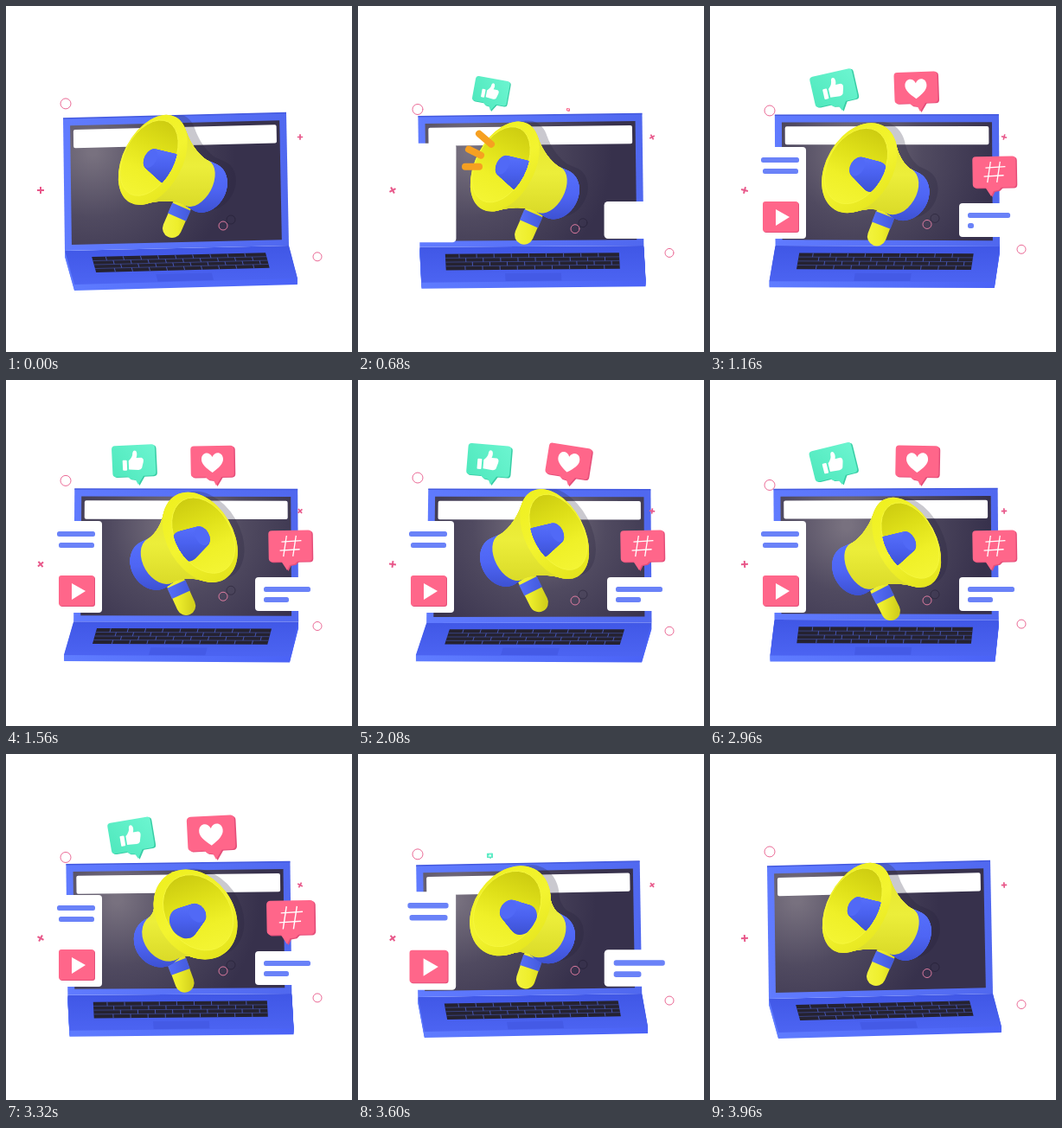
Animation, 400 px wide and 400 px high, one loop 4000 ms. Source, as an HTML page with a canvas:

```html
<!DOCTYPE html>
<html lang="en">
<head>
<meta charset="utf-8">
<title>Megaphone and laptop</title>
<style>
html, body { margin: 0; width: 100%; height: 100%; overflow: hidden; background: #fff; }
canvas { display: block; width: 400px; height: 400px; }
</style>
</head>
<body>
<canvas id="stage" width="400" height="400"></canvas>
<script>
const ctx = document.getElementById('stage').getContext('2d');
const LOOP = 4000, TAU = Math.PI * 2;
const BAR = '#6a82f8', PINK = '#ff668a', PINK_DARK = '#e54f7a', LINE = '#e8588a';

const clamp = x => Math.max(0, Math.min(1, x));
const mix = (a, b, k) => a + (b - a) * k;
const progress = (t, start, length) => clamp((t - start) / length);
const easeInOut = p => p < 0.5 ? 4 * p ** 3 : 1 - 4 * (1 - p) ** 3;
const easeOut = p => 1 - (1 - p) ** 3;
const backIn = p => 2.7 * p ** 3 - 1.7 * p * p;
const backOut = p => 1 - backIn(1 - p);
const wave = (t, mean, a, b) => mean + a * Math.cos(TAU * t / 2000) + b * Math.sin(TAU * t / 2000);

// Scale of something that pops in with overshoot and later pops out.
const pop = (t, start, length, leave) =>
  backOut(progress(t, start, length)) * (1 - backIn(progress(t, leave, 300)));

function polygon(points, fill) {
  ctx.beginPath();
  points.forEach(p => ctx.lineTo(p[0], p[1]));
  ctx.closePath();
  ctx.fillStyle = fill;
  ctx.fill();
}

function rounded(x, y, w, h, r, fill) {
  ctx.beginPath();
  ctx.roundRect(x, y, w, h, r);
  ctx.fillStyle = fill;
  ctx.fill();
}

function line(x1, y1, x2, y2, width, color, cap = 'butt') {
  ctx.beginPath();
  ctx.moveTo(x1, y1);
  ctx.lineTo(x2, y2);
  ctx.lineWidth = width;
  ctx.lineCap = cap;
  ctx.strokeStyle = color;
  ctx.stroke();
}

function placed(x, y, scale, angle, draw) {
  if (scale <= 0.01) return;
  ctx.save();
  ctx.translate(x, y);
  ctx.rotate(angle * Math.PI / 180);
  ctx.scale(scale, scale);
  draw();
  ctx.restore();
}

function gradient(x1, y1, x2, y2, ...colors) {
  const g = ctx.createLinearGradient(x1, y1, x2, y2);
  colors.forEach((c, i) => g.addColorStop(i / (colors.length - 1), c));
  return g;
}

// --- Laptop: corner poses blended along the swing -------------------------
const SWINGS = [0, 0.23, 0.87];
const POSES = [
  [66, 130, 324, 123.5, 327, 277, 68, 283, 337, 315, 79, 322],
  [69, 128, 328, 124.5, 330, 277, 71, 279, 333, 317, 74, 320],
  [79, 126, 337, 126.5, 338, 279.5, 78, 279, 328, 319.5, 67, 318]
];

function laptopCorners(swing) {
  const weights = SWINGS.map((a, i) => SWINGS.reduce(
    (w, b, j) => i === j ? w : w * (swing - b) / (a - b), 1));
  const v = POSES[0].map((_, n) => POSES.reduce((sum, pose, i) => sum + pose[n] * weights[i], 0));
  return [0, 2, 4, 6, 8, 10].map(i => [v[i], v[i + 1]]);
}

const within = ([a, b, c, d], u, v) => [0, 1].map(i =>
  mix(mix(a[i], b[i], u), mix(d[i], c[i], u), v));
const patch = (quad, u1, v1, u2, v2) =>
  [[u1, v1], [u2, v1], [u2, v2], [u1, v2]].map(([u, v]) => within(quad, u, v));

function drawKeyboard(deck) {
  const keys = patch(deck, 0.112, 0.2, 0.888, 0.66);
  polygon(keys, '#252230');
  const rows = 4;
  const seam = (u1, v1, u2, v2, w) =>
    line(...within(keys, u1, v1), ...within(keys, u2, v2), w, '#4656b4');
  for (let r = 0; r < rows; r++) {
    if (r) seam(0, r / rows, 1, r / rows, 0.6);
    for (let k = 1; k < 10; k++) {
      const u = (k - 0.2 + (r * 0.37) % 0.8) / 10;
      seam(u, r / rows, u, (r + 1) / rows, 1);
    }
  }
}

function drawLaptop(swing) {
  const [tl, tr, hr, hl, fr, fl] = laptopCorners(swing);
  const lid = [tl, tr, hr, hl], deck = [hl, hr, fr, fl];
  for (let d = 7; d > 0; d--) {
    polygon(deck.map(([x, y]) => [x, y + d]), gradient(70, 0, 335, 0, '#5f7cff', '#4a62f6'));
  }
  polygon(deck, gradient(0, 278, 0, 320, '#4057e6', '#4c64f2'));
  polygon(lid, gradient(70, 0, 330, 0, '#607bff', '#5068ef'));
  line(...tl, ...tr, 1.5, '#445ae0');

  const glowX = 100 + 110 * swing, glow = ctx.createRadialGradient(glowX, 168, 5, glowX, 168, 165);
  glow.addColorStop(0, '#78717f');
  glow.addColorStop(0.45, '#504a60');
  glow.addColorStop(1, '#37314c');
  polygon(patch(lid, 0.031, 0.055, 0.969, 0.955), glow);

  const bar = patch(lid, 0.053, 0.1, 0.947, 0.213);
  polygon(bar, '#fff');
  ctx.lineJoin = 'round';
  ctx.lineWidth = 4;
  ctx.strokeStyle = '#fff';
  ctx.stroke();

  drawKeyboard(deck);
  polygon(patch(deck, 0.375, 0.76, 0.625, 0.98), '#445ae6');
  return lid;
}

// --- Megaphone: rings along a tilted axis, painted back to front ----------
function bodyRadius(s) {
  if (s > 46) return 30 * Math.sqrt(Math.max(0, 1 - ((s - 46) / 19) ** 2));
  if (s > 30) return 29 + (s - 30) / 16;
  return 29 + 27 * ((30 - s) / 71) ** 1.7;
}

function drawMegaphone(t, lid) {
  const turn = 1 - 2 * easeInOut(progress(t, 985, 750)) + 2 * easeInOut(progress(t, 3075, 750));
  const px = 198.5, py = wave(t, 198, -5, 0);
  const ax = 0.7 * turn, ay = 0.37, az = Math.sqrt(1 - ax * ax - ay * ay);
  const tilt = Math.atan2(ay, ax);
  const at = s => [px + ax * s, py + ay * s];
  const ring = (s, r) => {
    const path = new Path2D();
    path.ellipse(...at(s), r * az, r, tilt, 0, TAU);
    return path;
  };
  const fillRing = (s, r, fill) => {
    ctx.fillStyle = fill;
    ctx.fill(ring(s, r));
  };

  const shadow = new Path2D();
  for (let s = 60; s >= -41; s -= 3) shadow.addPath(ring(s, bodyRadius(s)));
  ctx.save();
  polygon(lid, 'transparent');
  ctx.clip();
  ctx.translate(10, -3);
  ctx.fillStyle = 'rgba(35,30,55,.24)';
  ctx.fill(shadow, 'nonzero');
  ctx.restore();

  // Handle
  const top = [px + 1 + 6.5 * turn, py + 32], tip = [px + 2 - 8.5 * turn, py + 64];
  const along = k => [mix(top[0], tip[0], k), mix(top[1], tip[1], k)];
  const shade = (...c) => gradient(px - 18, 0, px + 18, 0, ...c);
  line(...top, ...tip, 22, shade('#f3f440', '#eeee2c', '#d2d01c'), 'round');
  line(...along(0.22), ...along(0.6), 23, shade('#5a74ff', '#4157d8'));

  // Body
  const yellow = gradient(px, py - 60, px, py + 45, '#e4e42a', '#ecee3a', '#d8d826');
  const blue = gradient(px, py - 12, px, py + 48, '#5670fc', '#4e65f4', '#3c50d0');
  for (let s = 65; s >= -41; s--) fillRing(s, bodyRadius(s), s > 32 ? blue : yellow);

  // Bell
  const [bx, by] = at(-41);
  fillRing(-41, 56, gradient(bx - 30, by - 50, bx + 30, by + 50, '#eff020', '#f3f430', '#e4e41c'));
  const mouth = ring(-47, 47);
  ctx.fillStyle = gradient(bx + 22 * turn, by - 45, bx - 22 * turn, by + 45,
    '#cccb10', '#dedf18', '#eff028', '#f4f534');
  ctx.fill(mouth);
  ctx.lineWidth = 1;
  ctx.strokeStyle = '#f6f73c';
  ctx.stroke(mouth);

  ctx.save();
  ctx.clip(mouth);
  const horn = gradient(bx, by - 18, bx, by + 32, '#5a73ff', '#4a61ef', '#3a4ecb');
  for (let s = -13; s >= -44; s--) fillRing(s, 12.5 + (s + 44) * 0.2, horn);
  fillRing(-45, 11.5, '#5169f6');
  ctx.restore();
}

// Each ray runs from its inner end to its outer end.
const LEFT_RAYS = [[154, 157, 140, 145], [142, 170, 128, 163], [140, 183, 124, 183]];
const RIGHT_RAYS = [[244, 156, 258, 140], [255, 169, 272, 159], [258, 182, 277, 181]];

function drawRays(t, rays, start) {
  const bob = wave(t, 0, -5, 0);
  const head = easeOut(progress(t, start, 200)), tail = easeInOut(progress(t, start + 340, 200));
  if (head - tail < 0.02) return;
  const pass = (dx, dy, color) => rays.forEach(([x1, y1, x2, y2]) => line(
    mix(x1, x2, tail) + dx, mix(y1, y2, tail) + bob + dy,
    mix(x1, x2, head) + dx, mix(y1, y2, head) + bob + dy, 8, color, 'round'));
  if (rays === RIGHT_RAYS) pass(9, -5, 'rgba(70,65,80,.25)');
  pass(0, 0, '#f6a021');
}

// --- Cards ----------------------------------------------------------------
function growingBar(t, x, y, width, start, length) {
  const p = progress(t, start, length);
  if (p > 0) rounded(x, y, Math.max(6, width * easeInOut(p)), 6, 2.5, BAR);
}

function drawCards(t) {
  placed(81, 216, pop(t, 390, 420, 3440), 0, () => {
    rounded(-30, -53, 60, 106, 4, '#fff');
    growingBar(t, -22, -41, 44, 700, 260);
    growingBar(t, -20, -28, 41, 800, 260);
    placed(1, 28, backOut(progress(t, 750, 300)), 0, () => {
      rounded(-20, -17, 41, 35, 3, PINK_DARK);
      rounded(-21, -18, 41, 35, 3, PINK);
      polygon([[-6, -9], [10, 0], [-6, 10]], '#fff');
    });
  });
  placed(322.5, 247.5, pop(t, 440, 420, 3460), 0, () => {
    rounded(-34.5, -19.5, 69, 39, 4, '#fff');
    growingBar(t, -24.5, -8.5, 54, 860, 420);
    growingBar(t, -24.5, 3.5, 29, 1020, 360);
  });
}

// --- Speech bubbles, anchored at the tip of the tail ----------------------
function bubbleShape(left, fill) {
  const side = left === -29 ? 1 : -1;
  rounded(left, -46, 50, 36, 4, fill);
  polygon([[-13 * side, -11], [-9 * side, -7], [-3 * side, -6], [0, 0], [7 * side, -11]], fill);
}

function bubble(left, main, dark, icon) {
  ctx.save();
  ctx.translate(1.5, 1);
  bubbleShape(left, dark);
  ctx.restore();
  bubbleShape(left, main);
  ctx.translate(left + 25, -28);
  icon();
}

function thumbIcon() {
  rounded(-13, -1, 5, 12, 1, '#fff');
  ctx.beginPath();
  ctx.moveTo(-6, 0);
  ctx.quadraticCurveTo(-1, -4, -1, -9);
  ctx.quadraticCurveTo(0, -13, 3, -11);
  ctx.quadraticCurveTo(5, -8, 3, -3);
  ctx.lineTo(9, -3);
  ctx.quadraticCurveTo(12, -2, 11, 2);
  ctx.lineTo(9, 9);
  ctx.quadraticCurveTo(8, 11, 5, 11);
  ctx.lineTo(-6, 10);
  ctx.fillStyle = '#fff';
  ctx.fill();
}

function heartIcon() {
  ctx.beginPath();
  ctx.moveTo(0, 13);
  ctx.bezierCurveTo(-7, 8, -13, 3, -12.5, -3);
  ctx.bezierCurveTo(-12, -11, -3, -12, 0, -5);
  ctx.bezierCurveTo(3, -12, 12, -11, 12.5, -3);
  ctx.bezierCurveTo(13, 3, 7, 8, 0, 13);
  ctx.fillStyle = '#fff';
  ctx.fill();
}

function hashIcon() {
  [-4, 7].forEach(x => line(x, -12, x - 4, 12, 1.3, '#fff'));
  [-5, 5].forEach(y => line(-11 - y / 5, y, 12 - y / 5, y - 1, 1.3, '#fff'));
}

function drawBubbles(t) {
  const arrive = 1 - progress(t, 600, 240);
  const green = gradient(-29, -10, 21, -46, '#4fe8bd', '#6cf5d0');
  placed(153, 121, pop(t, 608, 300, 3310), wave(t, -4.5, 9.5, 0) + 30 * arrive,
    () => bubble(-29, green, '#38cda5', thumbIcon));
  placed(243, 122, pop(t, 676, 300, 3200), wave(t, 4, 3.7, 5.8),
    () => bubble(-29, PINK, PINK_DARK, heartIcon));
  placed(325, 220, pop(t, 760, 300, 3200), -1,
    () => bubble(-21, PINK, PINK_DARK, hashIcon));
}

// --- Small ornaments ------------------------------------------------------
function circle(x, y, r, color) {
  ctx.beginPath();
  ctx.arc(x, y, r, 0, TAU);
  ctx.lineWidth = 0.9;
  ctx.strokeStyle = color;
  ctx.stroke();
}

function plus(t, x, y, r, width) {
  placed(x, y, 1, 360 * t / LOOP, () => {
    line(-r, 0, r, 0, width, LINE);
    line(0, -r, 0, r, width, LINE);
  });
}

function drawOrnaments(t) {
  circle(69, wave(t, 117.2, -4.3, 0), 6, LINE);
  circle(360, wave(t, 285.8, 4, 2.1), 5, LINE);
  const y = wave(t, 254.2, -0.2, 4);
  circle(260, y - 7, 5, 'rgba(25,20,40,.45)');
  circle(251, y, 5, '#ee82a8');
  plus(t, 40, 213, 4, 2);
  plus(t, 340, 151.5, 3.2, 1.7);
}

function render(t) {
  ctx.fillStyle = '#fff';
  ctx.fillRect(0, 0, 400, 400);
  const lid = drawLaptop((1 - Math.cos(TAU * t / LOOP)) / 2);
  drawMegaphone(t, lid);
  drawRays(t, LEFT_RAYS, 440);
  drawRays(t, RIGHT_RAYS, 2320);
  drawCards(t);
  drawBubbles(t);
  drawOrnaments(t);
}

const begin = performance.now();
function tick() {
  render((performance.now() - begin) % LOOP);
  requestAnimationFrame(tick);
}
tick();
</script>
</body>
</html>
```
